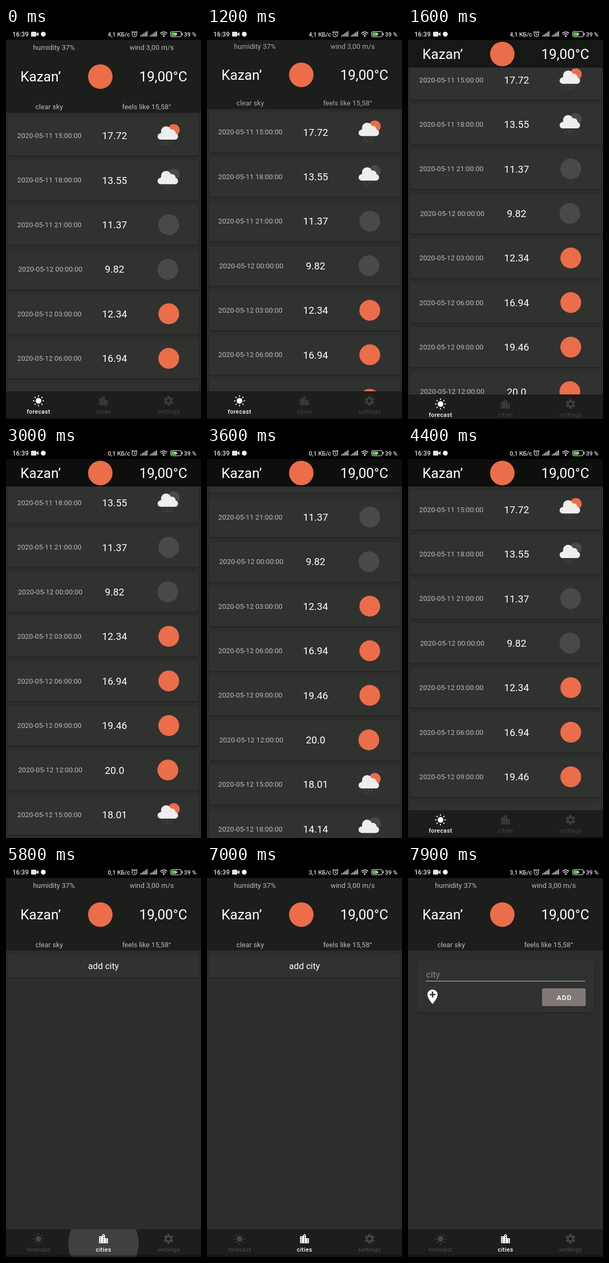
An HTML page for the animation above (8000 ms loop, 366 by 732 pixels).

```html
<!DOCTYPE html>
<html lang="en">
<head>
<meta charset="utf-8">
<title>Weather app</title>
<style>
html, body { margin: 0; width: 100%; height: 100%; overflow: hidden; background: #2d2e2c; }
svg { display: block; width: 366px; height: 732px; font: 13.2px Roboto, sans-serif; fill: #fff; }
.soft { fill: #b8bab8; }
.mid { text-anchor: middle; }
.status { font-size: 11px; font-weight: 500; fill: #e4e4e4; }
.tab { font-size: 11px; font-weight: 500; letter-spacing: .4px; }
</style>
</head>
<body>
<svg id="stage" viewBox="0 0 366 732"></svg>
<script>
const LOOP = 8000, TICK = 100;
const ORANGE = '#eb6d49', NIGHT = '#484a49', NAV = '#1c1d1c';
const HEADER_SHRINK = 84.5, PITCH = 83.4, NAV_TOP = 680;

// time, total scroll distance
const SCROLL = [[1150, 0], [1300, 20], [1600, 104.5], [1700, 135], [1850, 168], [2000, 180.5],
  [3000, 180.5], [3300, 207], [3600, 237], [3800, 246], [3900, 238], [4100, 150], [4300, 84.5],
  [4750, 84.5], [4900, 45], [5100, 0]];
const NAV_SHIFT = [[1550, 0], [1600, 6], [1700, 36], [1800, 52], [3850, 52], [4050, 8], [4150, 0]];
const LIFT = [[1500, 0], [1600, .4], [1750, 1], [4750, 1], [5000, 0]];

const TEMPS = ['17.72', '13.55', '11.37', '9.82', '12.34', '16.94', '19.46', '20.0', '18.01', '14.14', '11.62'];

const range = (n, f) => Array.from({ length: n }, (_, i) => f(i)).join('');
const clamp = v => Math.max(0, Math.min(1, v));
const fade = (t, from, to) => clamp((t - from) / (to - from));

function track(keys, t) {
  const i = keys.findIndex(k => k[0] > t);
  if (i < 0) return keys[keys.length - 1][1];
  if (i === 0) return keys[0][1];
  const [t0, a] = keys[i - 1], [t1, b] = keys[i];
  return a + (b - a) * (t - t0) / (t1 - t0);
}

const disc = (x, y, r, fill) => `<circle cx="${x}" cy="${y}" r="${r}" fill="${fill}"/>`;
const text = (x, y, s, cls = '', attrs = '') => `<text x="${x}" y="${y}" class="${cls}" ${attrs}>${s}</text>`;
const card = (x, y, w, h) =>
  `<rect x="${x}" y="${y + 1}" width="${w}" height="${h}" rx="2" fill="none" stroke="#252725" stroke-width="2.5"/>
   <rect x="${x}" y="${y}" width="${w}" height="${h}" rx="2" fill="#303230"/>`;

// Centred on its row
const cloud = sky => disc(9.5, -10.5, 11, sky) +
  `<g fill="#eeeeec">${[[-15, 1.5, 6], [-5, -8, 9.5], [5.5, -4, 7.5], [11.5, 1.5, 6]]
    .map(c => disc(...c, '#eeeeec')).join('')}<rect x="-15" y="-6" width="26.5" height="13.5"/></g>
   <path d="M-8 10l-1.5 3m8-3l-1.5 3m8-3l-1.5 3m-14 2l-1.5 3m8-3l-1.5 3m8-3l-1.5 3" stroke="#50514f" stroke-width="1.5"/>`;

function row(i) {
  const temp = TEMPS[i], nudge = temp.length < 5 ? 1.7 : 0;
  const date = new Date(Date.UTC(2020, 4, 11, 15 + 3 * i)).toISOString().slice(0, 19).replace('T', ' ');
  const hour = (15 + 3 * i) % 24, sky = hour > 2 && hour < 18 ? ORANGE : NIGHT;
  const cloudy = i < 2 || i > 7;
  return `<g transform="translate(0 ${201.5 + PITCH * i})">${card(4, -37.5, 358, 75)}
    ${text(21 + nudge, 4.5, date, 'soft')}
    ${text(203.8, 6.7, temp, 'mid', 'font-size="18.7"')}
    <g transform="translate(${305.5 - nudge} 0)">${cloudy ? cloud(sky) : disc(0, 0, 19.5, sky)}</g></g>`;
}

const bars = x => range(5, i => `<rect x="${x + i * 2.9}" y="${14 - i * 2}" width="1.7" height="${2 + i * 2}"/>`);
const status = `<rect width="366" height="22.5" fill="#000"/>
  <g fill="#e4e4e4">${text(12, 16, '16:39', 'status', 'style="font-size:12px"')}
  <rect x="47" y="7" width="10" height="9" rx="1.5"/><path d="M57 11l4-3.5v8l-4-3.5z"/>
  ${disc(70, 11.5, 4.5, '#fff')}
  ${text(191, 15.5, '', 'status', 'id="speed"')}
  <g fill="none" stroke="#e4e4e4" stroke-width="1.2"><circle cx="241" cy="12" r="4.3"/>
    <path d="M241 9.5v3l2 1M235.5 8.5l3-2.5M246.5 8.5l-3-2.5"/>
    <path d="M289.5 10q6.500-5.500 13 0M291.700 12.500q4.300-3.500 8.600 0" stroke-width="1.6"/>
    <rect x="309" y="6.500" width="20" height="10" rx="3.500"/></g>
  ${bars(252)}${bars(270)}${disc(296, 15, 1.7, '#e4e4e4')}
  <rect x="310.5" y="8" width="8" height="7" rx="2" fill="#55c443"/>
  <path d="M330 9.500h1.500v4h-1.500zM321 7l-5 5h3l-2 4 5.500-5h-3z"/>
  ${text(334, 15.5, '39 %', 'status')}</g>`;

const header = `<rect id="bar" y="22" width="366"/>
  <g id="upper">${text(90, 40.5, 'humidity 37%', 'soft mid')}${text(273.5, 40.5, 'wind 3,00 m/s', 'soft mid')}</g>
  <g id="title" font-size="26">${text(65, 100, 'Kazan’', 'mid')}${disc(177, 91, 23, ORANGE)}${text(295, 100, '19,00°C', 'mid')}</g>
  <g id="lower">${text(81, 151.5, 'clear sky', 'soft mid')}${text(264, 151.5, 'feels like 15,58°', 'soft mid')}</g>`;

// Icons are centred on 0,0
const spokes = (n, from, to, width) => range(n, i =>
  `<path d="M0 ${-from}V${-to}" transform="rotate(${i * 360 / n})" stroke="currentColor" stroke-width="${width}"/>`);
const windows = [[5, 9], [5, 13], [5, 17], [11, 5], [11, 9], [11, 13], [11, 17], [17, 13], [17, 17]]
  .map(([x, y]) => `M${x} ${y}h2v2h-2z`).join('');
const ICONS = {
  forecast: `<circle r="5.800"/>${spokes(8, 8.3, 11, 2)}`,
  cities: `<path fill-rule="evenodd" transform="translate(-12 -12)" d="M3 21V7h6V5l3-3 3 3v6h6v10z${windows}"/>`,
  settings: `<circle r="5.400" fill="none" stroke="currentColor" stroke-width="4"/>${spokes(6, 6, 9.8, 4.6)}`
};
const tab = (name, i) => `<g id="${name}" fill="currentColor" transform="translate(${61 + 122 * i} 0)">
  <g transform="translate(0 18) scale(.93)">${ICONS[name]}</g>${text(0, 42.3, name, 'tab mid')}</g>`;
const nav = `<g id="nav" clip-path="url(#navClip)"><rect width="366" height="52" fill="${NAV}"/>
  <circle id="tabRipple" cx="183" cy="26" fill="#3f403f"/>
  <rect y="48.500" width="366" height="3.500" fill="#000" opacity=".3"/>
  ${Object.keys(ICONS).map(tab).join('')}</g>`;

const addCity = `<g id="addCity">${card(3, 164.5, 360, 44)}
  <circle id="cardRipple" cx="183" cy="187" fill="#fff" opacity=".07" clip-path="url(#cardClip)"/>
  ${text(183, 193, 'add city', 'mid', 'font-size="16.6"')}</g>`;
const form = `<g id="form">${card(16, 176, 334, 98)}
  ${text(34, 208.5, 'city', '', 'font-size="16.6" fill="#8c8d8b"')}
  <path d="M33.500 215.500H332.500" stroke="#c4c5c3"/>
  <path transform="translate(29.700 228.500) scale(1.36)" d="M12 2C8.140 2 5 5.140 5 9c0 5.250 7 13 7 13s7-7.750 7-13c0-3.860-3.140-7-7-7zm4 8h-3v3h-2v-3H8V8h3V5h2v3h3z"/>
  <rect x="251.500" y="230" width="82" height="34" rx="3" fill="#232423"/>
  <rect x="251.500" y="229" width="82" height="33.500" rx="3" fill="#7f7877"/>
  ${text(279, 250.7, 'ADD', '', 'font-size="13" font-weight="500" letter-spacing="1.1"')}</g>`;

document.getElementById('stage').innerHTML = `<defs>
  <clipPath id="navClip"><rect width="366" height="52"/></clipPath>
  <clipPath id="cardClip"><rect x="3" y="164" width="360" height="45"/></clipPath></defs>
  <rect width="366" height="732" fill="#2d2e2c"/>
  <g id="list">${range(TEMPS.length, row)}</g>${addCity}${form}${header}${nav}${status}`;

const $ = id => document.getElementById(id);
const set = (id, attrs) => { for (const k in attrs) $(id).setAttribute(k, attrs[k]); };
const shift = (id, y) => set(id, { transform: `translate(0 ${y})` });

function draw(t) {
  const scroll = track(SCROLL, t), shrink = Math.min(scroll, HEADER_SHRINK), p = shrink / HEADER_SHRINK;
  const onCities = t >= 5700, lift = track(LIFT, t);

  shift('list', -scroll);
  set('list', { display: onCities ? 'none' : 'inline' });

  set('bar', { height: 136.5 - shrink, fill: `rgb(${28 - 15 * lift},${30 - 15 * lift},${28 - 15 * lift})` });
  shift('title', -shrink / 2);
  shift('upper', -shrink / 4);
  shift('lower', -shrink);
  set('upper', { opacity: clamp(1 - 1.4 * p) });
  set('lower', { opacity: clamp(1 - 1.4 * p) });

  shift('nav', NAV_TOP + track(NAV_SHIFT, t));
  set('tabRipple', { r: t >= 5600 && t < 5900 ? 30 + 36 * fade(t, 5600, 5800) : 0 });
  $('forecast').style.color = onCities ? '#444644' : '#fff';
  $('cities').style.color = onCities ? '#fff' : '#3c3e3c';
  $('settings').style.color = onCities ? '#444644' : '#3c3e3c';

  const open = fade(t, 7500, 7800);
  set('addCity', { opacity: onCities ? 1 - open : 0 });
  set('cardRipple', { r: t < 7400 ? 0 : 60 + 130 * fade(t, 7400, 7600) });
  set('form', { opacity: open });

  $('speed').textContent = (t < 2400 ? '4,1' : t < 6800 ? '0,1' : '3,1') + ' КБ/с';
}

function frame() {
  const t = performance.now() % LOOP;
  draw(Math.floor(t / TICK) * TICK);
  requestAnimationFrame(frame);
}
frame();
</script>
</body>
</html>
```
